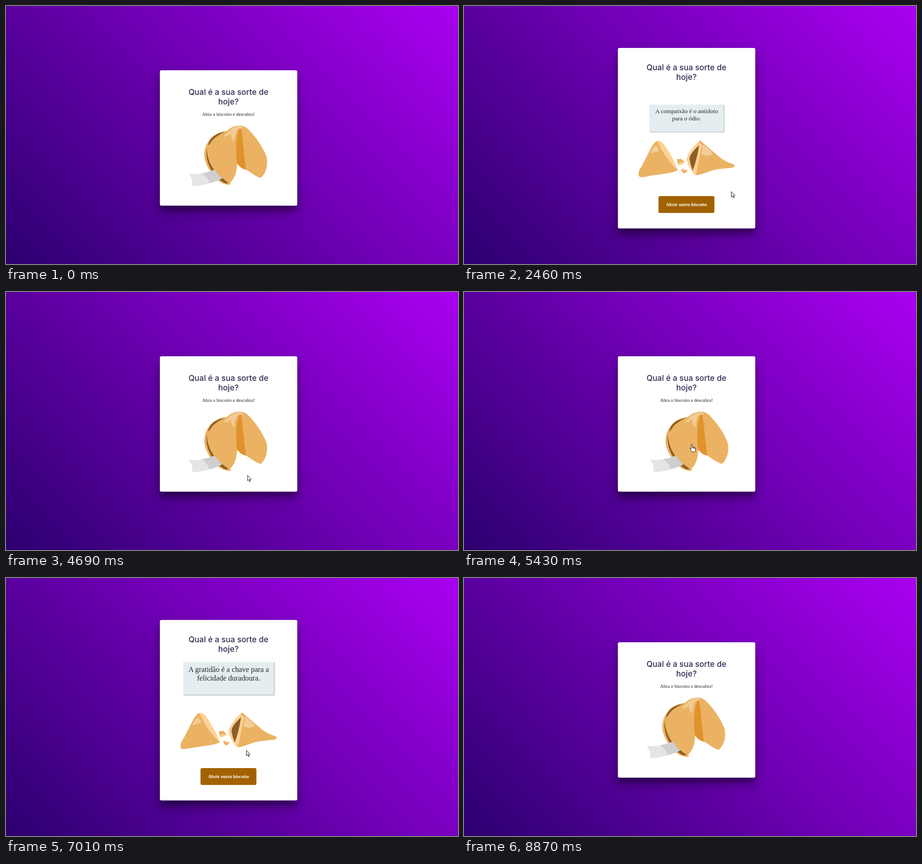
These frames come from a looping animation (990 by 566 pixels, 9460 ms). An HTML page:

```html
<!DOCTYPE html>
<html lang="pt-BR">
<head>
<meta charset="utf-8">
<title>Biscoito da sorte</title>
<style>
html, body { margin: 0; width: 100%; height: 100%; overflow: hidden; }
body { background: linear-gradient(45deg, #2c006f, #a900f0); }
#card {
  position: absolute; left: 337px; width: 300.5px; background: #fff; border-radius: 3.5px;
  box-shadow: 0 14px 28px rgba(0, 0, 0, .32), 0 11px 9px rgba(0, 0, 0, .24);
}
svg { position: absolute; left: 0; top: 0; display: block; }
text { text-anchor: middle; font-family: "Liberation Serif", "Times New Roman", serif; }
.title text { font: 500 17.4px Inter, "Open Sans", sans-serif; fill: #312b50; }
.small { font-size: 10.5px; fill: #222; }
.btn { font-size: 10.5px; font-weight: bold; fill: #fff; }
.luck text { font-size: 16.8px; fill: #262626; }
.luck rect { fill: #e4edf0; filter: drop-shadow(1.2px 1.2px .8px rgba(0, 0, 0, .4)); }
.base { fill: #eab262; }
.light { fill: #fdd196; }
.shine { fill: #f2cc97; }
.dark { fill: #8d5d27; }
.cursor path { fill: #fff; stroke: #111; stroke-width: 1; stroke-linejoin: round; }
</style>
</head>
<body>
<div id="card"></div>
<svg width="990" height="566" viewBox="0 0 990 566">
  <g class="title" id="title">
    <text x="487.2" y="195.3">Qual é a sua sorte de</text>
    <text x="487.2" y="215.8">hoje?</text>
  </g>

  <g id="closed">
    <text class="small" x="487.2" y="240.5">Abra o biscoito e descubra!</text>
    <g id="cookie">
      <path class="base" d="M509 263C518 261 525 265 531 271C548 288 562 309 570 329C575 347 570 367 558 377C547 374 537 366 526 359L512 300Z"/>
      <path class="base" d="M511 263C502 262 491 267 484 274C466 276 452 283 444 296C434 310 432 328 437 342C443 360 456 376 466 384C474 390 484 393 491 392Q493 390 491 387C501 379 506 363 506 345L513 270Z"/>
      <path fill="#e0922c" d="M512 269C505 278 502 312 506 346C512 352 515 357 526 359C521 331 519 288 515 271Q514 268 512 269Z"/>
      <path class="shine" d="M477 286C486 275 498 264 512 264Q519 264 518 268Q513 268 510 269C503 271 502 286 499 298C494 292 492 285 493 278C489 284 484 286 477 286Z"/>
      <path class="dark" d="M443 306C444 291 460 279 480 276C466 282 455 290 450 297Q446 304 443 306Z"/>
      <path class="dark" d="M440 312C436 335 446 357 458 371L470 383C477 388 484 391 487 388C476 380 465 370 456 360C446 346 440 330 440 312Z"/>
      <path fill="#e5e5e5" d="M400 368Q416 370 429 367Q443 377 446 389Q428 395 408 395Q410 380 400 368Z"/>
      <path fill="#cfcfcf" d="M429 367Q444 364 457 359Q464 369 474 378Q461 385 446 389Q443 377 429 367Z"/>
    </g>
  </g>

  <g id="opened">
    <path class="base" d="M425 296C418 297 413 305 410 311L389 352C383 359 381 367 383 373C386 377 393 375 400 374C420 370 445 368 456 365Q467 362 468 359C460 340 448 318 438 304Q431 295 425 296Z"/>
    <path class="light" d="M424 296.500Q431 294 438 304C449 319 460 338 468 359L463 356C447 339 434 320 424 296.500Z"/>
    <path class="shine" d="M420 306C414 310 410 317 408 323Q419 321 427 318Q426 309 420 306Z"/>
    <path class="base" d="M466 336L476 335.500L483 342L479 347L469 350Z"/>
    <path class="light" d="M470 344L483 342L479 347L469 350Z"/>
    <path class="base" d="M476 357Q484 357 490 361Q485 368 481 367Q476 364 476 357Z"/>
    <path class="light" d="M476 357Q484 357 490 361Q482 363 476 357Z"/>
    <path class="base" d="M517 295L558 330C570 340 580 344 590 347Q596 350 590 354C575 357 557 356 540 362C527 366 515 372 506 371L500 340Z"/>
    <path class="light" d="M517 295C505 305 490 322 487 337C490 350 498 362 505 371L508 371L522 302Z"/>
    <path class="base" d="M517 295L513 301Q517 300 521 305L524 301Z"/>
    <path class="dark" d="M515 305C503 317 493 328 494 337Q496 349 501 361Q511 334 515 305Z"/>
    <path class="shine" d="M523 304Q523 315 520 325Q532 332 545 325Q539 314 523 304Z"/>
    <rect x="426" y="417" width="122.500" height="37" rx="3.500" fill="#a36200"/>
    <text class="btn" x="487.2" y="439">Abrir outro biscoito</text>
    <g class="luck" id="luck">
      <rect x="-102.500" y="-37.300" width="205" height="74.600"/>
      <text y="-14.700" id="line1"></text>
      <text y="5.300" id="line2"></text>
    </g>
  </g>

  <g class="cursor" id="cursor">
    <path id="arrow" d="M.5 0V12L3.300 9.500L5.200 14L7 13.200L5.200 8.900H8.500Z"/>
    <g id="hand">
      <path d="M-1.500 9V1Q-1.500 -.500 0 -.500T1.500 1V5Q3.800 4.300 4 6Q6 5.200 6.300 6.800Q8 6.300 8 8V11Q8 13.500 6.500 16H.500Q-1 13-3.500 10.200Q-4.500 8-3 8Q-2.200 8-1.500 9Z"/>
      <path d="M1.500 5V8M4 6V8.500M6.300 6.800V9" fill="none" stroke-width=".8"/>
    </g>
  </g>
</svg>
<script>
const LOOP = 9460, GROW = 2000, SHAKE = 400, REACH = 7;
const $ = id => document.getElementById(id);
const show = (id, on) => $(id).style.display = on ? '' : 'none';
const move = (id, x, y, s = 1) => $(id).setAttribute('transform', `translate(${x} ${y}) scale(${s})`);
const mix = (a, b, p) => a + (b - a) * p;
const smooth = p => p * p * (3 - 2 * p);

// Each round: pointer reaches the cookie, cookie opens, card closes again.
const rounds = [
  { hover: 710, open: 1774, close: 3950, text: ['A compaixão é o antídoto', 'para o ódio.'] },
  { hover: 4730, open: 5610, close: 8110, text: ['A gratidão é a chave para a', 'felicidade duradoura.'] }
];

// Pointer stops: time, x, y
const stops = [
  [120, 868, 566], [970, 499, 306], [1780, 499, 306], [2350, 585, 407],
  [3050, 585, 407], [3800, 540, 428], [4420, 540, 428], [5200, 499, 335],
  [6300, 499, 335], [7010, 526, 378], [7290, 528, 383], [7690, 520, 436],
  [8150, 520, 436], [8830, 920, 568]
];

// CSS "ease": cubic-bezier(.25, .1, .25, 1)
function ease(x) {
  if (x <= 0) return 0;
  if (x >= 1) return 1;
  const curve = (u, a, b) => 3 * (1 - u) ** 2 * u * a + 3 * (1 - u) * u * u * b + u ** 3;
  let lo = 0, hi = 1;
  for (let i = 0; i < 24; i++) {
    const mid = (lo + hi) / 2;
    if (curve(mid, .25, .25) < x) lo = mid; else hi = mid;
  }
  return curve(lo, .1, 1);
}

function shakeAt(time) {
  const p = time / SHAKE % 1;
  if (p < .25) return -REACH * ease(p * 4);
  if (p < .75) return mix(-REACH, REACH, ease((p - .25) * 2));
  return REACH * (1 - ease((p - .75) * 4));
}

function pointerAt(t) {
  const i = stops.findIndex(s => s[0] > t);
  if (i < 1) return null;
  const [t0, x0, y0] = stops[i - 1], [t1, x1, y1] = stops[i];
  const p = smooth((t - t0) / (t1 - t0));
  return [mix(x0, x1, p), mix(y0, y1, p)];
}

function draw(t) {
  const round = rounds.find(r => t >= r.hover && t < r.close);
  const open = !!round && t >= round.open;
  const hover = !!round && !open;

  $('card').style.top = (open ? 91.5 : 140.5) + 'px';
  $('card').style.height = (open ? 396 : 297.5) + 'px';
  move('title', 0, open ? -54 : 0);
  show('closed', !open);
  show('opened', open);
  move('cookie', hover ? shakeAt(t - round.hover) : 0, 0);

  if (open) {
    const p = ease((t - round.open) / GROW);
    move('luck', 487.6, 215.8 + 75 * (1 - p), mix(.5, 1, p));
    $('line1').textContent = round.text[0];
    $('line2').textContent = round.text[1];
  }

  const at = pointerAt(t);
  show('cursor', at);
  if (at) {
    const onButton = open && at[1] > 417 && at[0] < 548.5;
    const hand = hover || onButton;
    show('hand', hand);
    show('arrow', !hand);
    move('cursor', at[0], at[1]);
  }
}

function tick() {
  draw(performance.now() % LOOP);
  requestAnimationFrame(tick);
}
tick();
</script>
</body>
</html>
```
